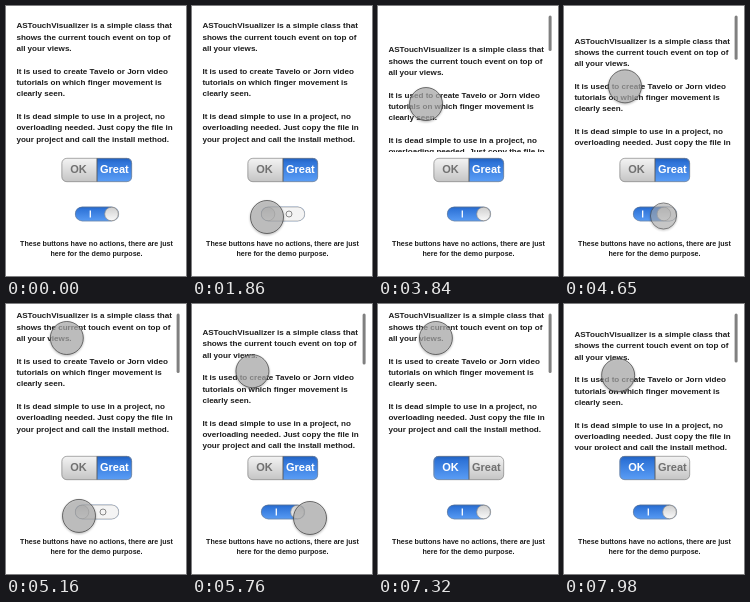
Write an HTML page that moves like this. It is 180 px wide and 270 px high and loops after 8 s.

```html
<!DOCTYPE html>
<html lang="en">
<head>
<meta charset="utf-8">
<title>Touch demo</title>
<style>
  html, body { margin: 0; width: 100%; height: 100%; overflow: hidden; background: #fff; }
  svg { display: block; width: 180px; height: 270px; }
  text { font-family: "Liberation Sans", Arial, sans-serif; font-weight: bold; }
  .copy { fill: #1c1c1c; }
  #story { font-size: 8.08px; }
  #note { font-size: 7.11px; text-anchor: middle; }
  .label { font-size: 11px; text-anchor: middle; }
  .disc { filter: drop-shadow(.8px 1px 1px rgba(0, 0, 0, .35)); }
</style>
</head>
<body>
<svg viewBox="0 0 180 270">
  <defs>
    <linearGradient id="blue" x2="0" y2="1">
      <stop offset="0" stop-color="#1f5fbe"/><stop offset=".2" stop-color="#2f74d8"/>
      <stop offset="1" stop-color="#5b9ef6"/>
    </linearGradient>
    <linearGradient id="gray" x2="0" y2="1">
      <stop offset="0" stop-color="#f4f4f4"/><stop offset="1" stop-color="#c4c4c4"/>
    </linearGradient>
    <linearGradient id="knobFill" x2="0" y2="1">
      <stop offset="0" stop-color="#cfcfcf"/><stop offset="1" stop-color="#fafafa"/>
    </linearGradient>
    <clipPath id="view"><rect y="9" width="180" height="137"/></clipPath>
    <clipPath id="segments"><rect x="55.5" y="152" width="70.5" height="24" rx="5"/></clipPath>
    <clipPath id="pill"><rect x="69" y="200.7" width="44" height="14.5" rx="7.25"/></clipPath>
  </defs>

  <g clip-path="url(#view)"><g id="story" class="copy"></g></g>
  <rect id="bar" x="170.6" y="9.5" width="3" rx="1.5" fill="#808080"/>

  <g clip-path="url(#segments)">
    <rect id="okBack" x="55" y="152" width="36" height="24"/>
    <rect id="greatBack" x="91" y="152" width="35" height="24"/>
    <path d="M91 152v24" stroke="#555" stroke-width=".9"/>
  </g>
  <rect x="55.9" y="152.3" width="69.8" height="23.4" rx="5" fill="none" stroke="#8a8a8a" stroke-width=".7"/>
  <text id="ok" class="label" x="72.4" y="167.4">OK</text>
  <text id="great" class="label" x="108.3" y="167.4">Great</text>

  <g clip-path="url(#pill)">
    <rect x="69" y="200" width="44" height="16" fill="url(#blue)"/>
    <g id="slide">
      <rect x="105.5" y="200" width="44" height="16" fill="#f4f4f4"/>
      <path d="M84.3 204.6v7" stroke="#fff" stroke-width="1.3"/>
      <circle cx="126.5" cy="208" r="3" fill="none" stroke="#888"/>
      <circle cx="105.5" cy="208" r="6.8" fill="url(#knobFill)" stroke="#8d8d8d" stroke-width=".7"/>
    </g>
  </g>
  <rect x="69.3" y="201" width="43.4" height="14" rx="7" fill="none" stroke="#777" stroke-opacity=".7" stroke-width=".7"/>

  <g id="note" class="copy">
    <text x="90.5" y="239.8">These buttons have no actions, there are just</text>
    <text x="90.5" y="250">here for the demo purpose.</text>
  </g>
  <g id="touches"></g>
</svg>
<script>
const LOOP = 8000, START = performance.now();
const $ = id => document.getElementById(id);
const clamp = (v, lo = 0, hi = 1) => Math.min(hi, Math.max(lo, v));

const lines = [
  "ASTouchVisualizer is a simple class that", "shows the current touch event on top of", "all your views.", "",
  "It is used to create Tavelo or Jorn video", "tutorials on which finger movement is", "clearly seen.", "",
  "It is dead simple to use in a project, no", "overloading needed. Just copy the file in",
  "your project and call the install method."];
$("story").innerHTML = lines.map((s, i) => `<text x="10.4" y="${22.4 + i * 11.32}">${s}</text>`).join("");

// Eased value at time t along [time, value] pairs
function track(t, keys) {
  if (t <= keys[0][0]) return keys[0][1];
  for (let i = 1; i < keys.length; i++) {
    const [t0, a] = keys[i - 1], [t1, b] = keys[i];
    if (t < t1) {
      const u = (t - t0) / (t1 - t0);
      return a + (b - a) * u * u * (3 - 2 * u);
    }
  }
  return keys[keys.length - 1][1];
}

const scrollX = [[3250, 37], [4500, 61], [6800, 60], [8100, 54]];
const scrollY = [[3250, 45], [3800, 98], [4350, 102], [5150, 34], [6450, 107], [6580, 107], [7250, 34], [7400, 34], [8350, 90]];
const dragOne = [[400, 105], [850, 75], [2100, 75], [2800, 121]];
const dragTwo = [[4550, 104], [4700, 98], [5050, 73], [5250, 73], [5700, 118]];
const knobX = [[400, 105.5], [800, 76], [2150, 76], [2600, 105.5], [4550, 105.5], [4700, 98], [5000, 76], [5280, 76], [5600, 105.5]];

const tap = (from, to, x) => ({ from, to, x: () => x, y: () => 163 });
const touches = [
  { from: 2892, to: 9000, x: t => track(t, scrollX), y: t => track(t, scrollY) },
  { from: 30, to: 3480, x: t => track(t, dragOne), y: t => track(t, [[400, 208], [850, 211], [2100, 211], [2800, 212.5]]) },
  { from: 4195, to: 5950, x: t => track(t, dragTwo), y: t => track(t, [[4650, 210], [5700, 214]]) },
  tap(1290, 1540, 72), tap(1480, 1740, 112), tap(6404, 6900, 72)];

// A red ring closes in on each new touch, then its disc swells
function drawTouch({ from, to, x, y }, t) {
  const age = t - from;
  if (age < 0 || t > to + 100) return "";
  const close = clamp(age / 400), swell = clamp((age - 400) / 150);
  const fadeOut = clamp((to + 100 - t) / 100);
  const at = `cx="${x(t)}" cy="${y(t)}"`;
  const ringAlpha = clamp(close * 1.5) * clamp((1 - close) * 6) * fadeOut;
  return `<circle class="disc" ${at} r="${11 + 5.5 * swell}" fill="#b8b8b8" fill-opacity=".66" stroke="#444"
      stroke-opacity=".75" opacity="${clamp(age / 150) * fadeOut * (.75 + .25 * swell)}"/>
    <circle ${at} r="${50 - 35 * close}" fill="none" stroke="#f04a4a" stroke-width="5" opacity="${ringAlpha}"/>`;
}

function draw(now) {
  const t = Math.max(0, now - START) % LOOP;

  const pull = (track(t, scrollY) - 50) / 2;
  const offset = t < 3500 ? Math.max(0, pull) : pull;
  $("story").setAttribute("transform", `translate(0 ${offset})`);
  $("bar").setAttribute("height", 59.5 - Math.max(0, offset));
  $("bar").setAttribute("opacity", clamp((t - 3300) / 150));

  const okOn = t >= 6500 || (t >= 1390 && t < 1580);
  for (const [id, on] of [["ok", okOn], ["great", !okOn]]) {
    $(id + "Back").setAttribute("fill", on ? "url(#blue)" : "url(#gray)");
    $(id).setAttribute("fill", on ? "#fff" : "#707070");
  }

  $("slide").setAttribute("transform", `translate(${track(t, knobX) - 105.5} 0)`);
  $("touches").innerHTML = touches.map(touch => drawTouch(touch, t)).join("");
  requestAnimationFrame(draw);
}
draw(START);
</script>
</body>
</html>
```
